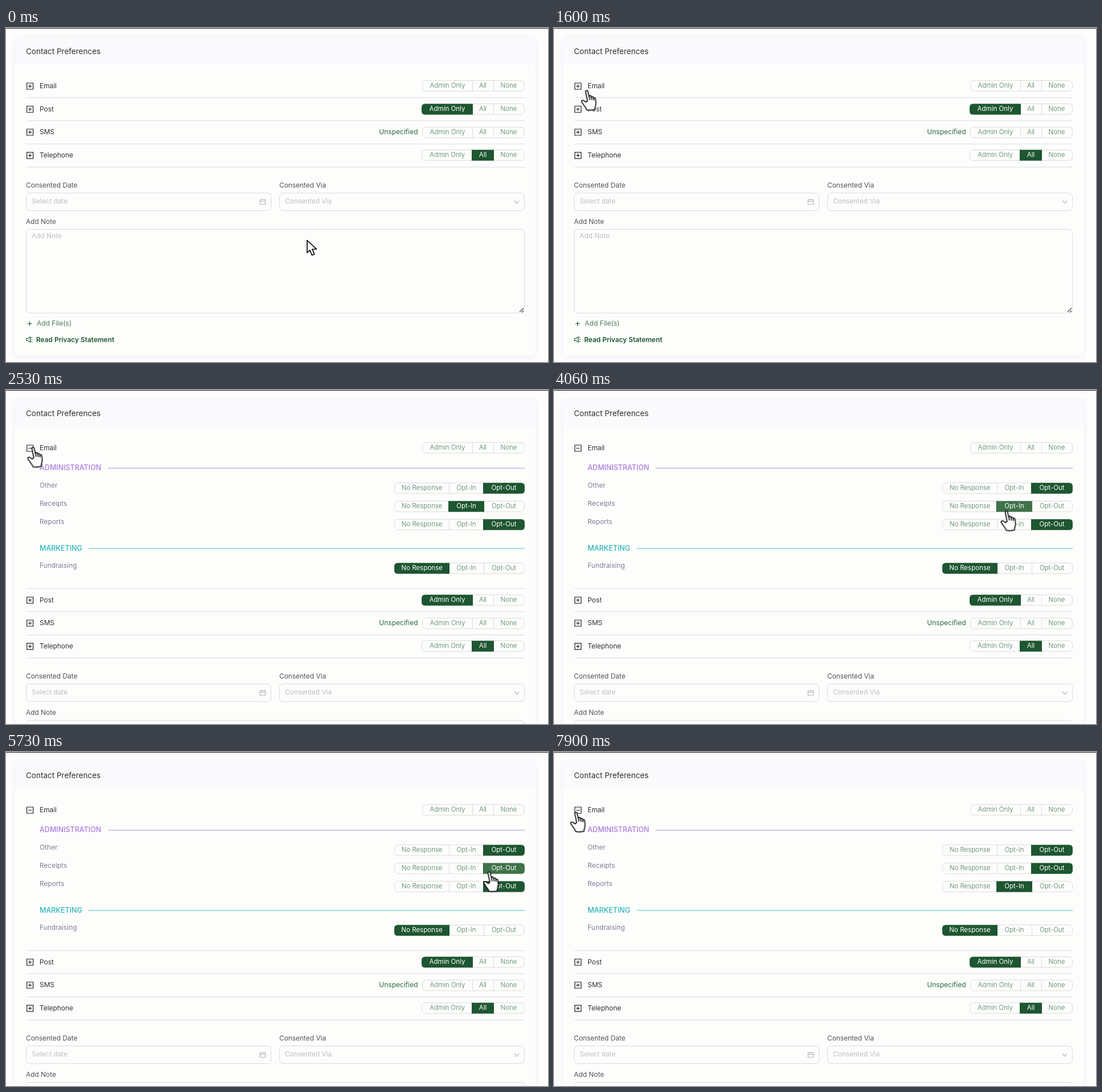
An HTML page that plays this animation: 952x588 px, repeating every 8000 ms.

```html
<!DOCTYPE html>
<html lang="en">
<head>
<meta charset="utf-8">
<title>Contact Preferences</title>
<style>
  html, body { margin: 0; width: 100%; height: 100%; overflow: hidden; background: #fefefe; }
  svg { display: block; width: 952px; height: 588px; }
  text { font: 400 11.9px Inter, "Open Sans", sans-serif; }
  .card { filter: drop-shadow(0 1px 6px rgba(150, 160, 215, .2)); }
  .icon { fill: none; stroke-width: 1.2; }
</style>
</head>
<body>
<svg id="stage" viewBox="0 0 952 588"></svg>
<script>
const LOOP = 8000, SHIFT = 227;
const GREEN = '#1d5630', HOVER = '#3f7249', PAPER = '#fdfefc', LINK = '#4b7a60';
const DARK = '#303033', LABEL = '#505256', MUTED = '#7b7f94', HINT = '#bdbebe';
const EDGE = '#d9dada', RULE = '#dfe0ed';
const LOOKS = {
  off: { fill: GREEN, opacity: 0, ink: LINK, weight: 300 },
  on: { fill: GREEN, opacity: 1, ink: '#ffffff', weight: 400 },
  hover: { fill: HOVER, opacity: 1, ink: '#ffffff', weight: 400 }
};
const stage = document.getElementById('stage');

function add(parent, tag, attrs = {}, content) {
  const el = document.createElementNS('http://www.w3.org/2000/svg', tag);
  for (const k in attrs) el.setAttribute(k, attrs[k]);
  if (content) el.textContent = content;
  parent.append(el);
  return el;
}

const group = parent => add(parent, 'g');
const label = (parent, x, y, content, fill = DARK, style = '') =>
  add(parent, 'text', { x, y, fill, style }, content);
const rule = (parent, x, y, stroke = RULE) =>
  add(parent, 'path', { d: `M${x} ${y}H911`, stroke, 'stroke-width': 1.3 });
const box = (parent, x, y, width, height, rx = 6) =>
  add(parent, 'rect', { x, y, width, height, rx, fill: PAPER, stroke: EDGE });
const icon = (parent, d, stroke) => add(parent, 'path', { d, stroke, class: 'icon' });

// steps: [time, value, easing to the next step]
function play(el, prop, steps, easing = 'ease') {
  const full = [...steps];
  if (full[0][0] > 0) full.unshift([0, full[0][1]]);
  if (full.at(-1)[0] < LOOP) full.push([LOOP, full.at(-1)[1]]);
  el.animate(
    full.map(([t, v, e]) => ({ offset: t / LOOP, [prop]: v, easing: e || easing })),
    { duration: LOOP, iterations: Infinity });
}

function segment(parent, x0, x1, y, name, look, first, last) {
  const l = first ? 6 : 0, r = last ? 6 : 0, top = y + .4, bottom = top + 19.2;
  const d = `M${x0 + l} ${top}H${x1 - r}q${r} 0 ${r} ${r}V${bottom - r}q0 ${r} ${-r} ${r}` +
    `H${x0 + l}q${-l} 0 ${-l} ${-l}V${top + l}q0 ${-l} ${l} ${-l}z`;
  const back = add(parent, 'path', { d, fill: look.fill, opacity: look.opacity });
  const edge = add(parent, 'path', {
    d: `M${x0 + .5} ${top}V${bottom}`, stroke: GREEN, opacity: first ? 0 : look.opacity
  });
  const text = label(parent, (x0 + x1) / 2, y + 13.2, name, look.ink,
    `font-size:11.5px;font-weight:${look.weight};text-anchor:middle`);
  return { back, edge, text };
}

function choices(parent, y, names, edges, selected) {
  const end = names.length;
  box(parent, edges[0] + .5, y + .5, edges[end] - edges[0] - 1, 18.7);
  for (const x of edges.slice(1, end))
    add(parent, 'path', { d: `M${x + .5} ${y + 1}v18`, stroke: EDGE });
  return names.map((name, i) => segment(parent, edges[i] - (i ? 1 : 0),
    edges[i + 1] + (i < end - 1 ? 1 : 0), y, name,
    i === selected ? LOOKS.on : LOOKS.off, i === 0, i === end - 1));
}

// A selected label is a little bolder, which widens its group
const scope = (parent, y, selected) =>
  choices(parent, y, ['Admin Only', 'All', 'None'], [selected < 0 ? 731 : 730, 819, 856, 911], selected);
const response = (parent, y, selected) =>
  choices(parent, y, ['No Response', 'Opt-In', 'Opt-Out'], [682, 778, 839, 911], selected);

function toggle(parent, y) {
  icon(parent, `M36.6 ${y - 5.5}h11v11h-11zM39 ${y}h6.2`, '#222');
  return icon(parent, `M42.1 ${y - 3.1}v6.2`, '#222');
}

// Page and card
add(stage, 'rect', { width: 952, height: 588, fill: '#fefefe' });
const card = add(stage, 'rect', { x: 16, y: 17, width: 914, height: 560, rx: 7, fill: PAPER, class: 'card' });
add(stage, 'path', { d: 'M16 64V24q0-7 7-7H923q7 0 7 7V64z', fill: '#fafafd' });
add(stage, 'rect', { width: 952, height: 1, fill: '#1c1c1c' });
label(stage, 35, 45.5, 'Contact Preferences', DARK, 'font-size:13.5px');

// Email details
const detail = group(stage);
const heading = 'font-size:12.5px;font-weight:500';
label(detail, 59, 141.3, 'ADMINISTRATION', '#ab7be0', heading);
rule(detail, 179, 137.7, '#c2a6e6');
label(detail, 59, 282.7, 'MARKETING', '#2bb7bb', heading);
rule(detail, 145, 278.8, '#62d0d2');
const [, receipts, reports] = [
  ['Other', 163, 2], ['Receipts', 195, 1], ['Reports', 227, 2], ['Fundraising', 304, 0]
].map(([name, y, selected]) => {
  label(detail, 59, y + 9.3, name, MUTED);
  return response(detail, y, selected);
});

// Everything below slides down to uncover the details
const lower = group(stage);
add(lower, 'rect', { x: 28, y: 123, width: 890, height: 445, fill: PAPER });
for (const y of [122.7, 163.2, 204.2, 244.8]) rule(lower, 36, y);
[['Post', 143, 0], ['SMS', 183.5, -1], ['Telephone', 224.3, 1]].forEach(([name, y, selected]) => {
  toggle(lower, y);
  label(lower, 59, y + 3.7, name);
  scope(lower, Math.round(y - 10), selected);
});
label(lower, 723.5, 187, 'Unspecified', '#2b6541', 'font-size:12px;text-anchor:end');

label(lower, 35, 281, 'Consented Date', LABEL);
label(lower, 480, 281, 'Consented Via', LABEL);
label(lower, 35, 345, 'Add Note', LABEL);
const dateBox = box(lower, 35.5, 290.5, 430, 31);
box(lower, 480.5, 290.5, 430, 31);
const noteBox = box(lower, 35.5, 354.5, 875, 147.5);
label(lower, 45, 309.3, 'Select date', HINT);
label(lower, 490, 309.3, 'Consented Via', HINT);
label(lower, 45, 369.7, 'Add Note', HINT);
icon(lower, 'M446.2 302.5h9.4v8h-9.4zM446.2 305.5h9.4M448.6 301v2.8M453.2 301v2.8', '#b4b5b5');
icon(lower, 'M893 304l4 4.8 4-4.8', '#b4b5b5');
icon(lower, 'M902 500l7-7M906 500.5l3-3', '#444');
icon(lower, 'M37.5 520.5h8M41.5 516.5v8', GREEN);
label(lower, 54, 524.3, 'Add File(s)', LINK, 'font-size:12px');
icon(lower, 'M36 546.5h2.6l4-2.7v9.4l-4-2.7H36zM44.2 545.6l1.8-1M44.4 548.5h2M44.2 551.4l1.8 1', GREEN);
label(lower, 53, 552.7, 'Read Privacy Statement', GREEN, 'font-weight:600');

// Email row
const emailBar = toggle(stage, 102.5);
label(stage, 59, 106, 'Email');
scope(stage, 92, -1);

// Pointer
const pointer = group(stage);
const ink = { fill: '#fff', stroke: '#161616', 'stroke-width': 1.8, 'stroke-linejoin': 'round', 'stroke-linecap': 'round' };
const arrow = add(pointer, 'path', { ...ink, d: 'M.9 .9V22.6L5.8 18.2 9.5 27 13.7 25.2 10 16.6 17.4 16.2z' });
const hand = add(pointer, 'g', { ...ink, transform: 'translate(-9.5 -.8)' });
add(hand, 'path', {
  d: 'M8.1 3C7.6.5 11.4 0 12 2.4L14.2 11.2C14.6 9.5 17.4 9.6 18 11.5L18.2 12.5C19 11 21.5 11.4 21.8 13.3' +
     'L22 14.2C23 13 25.2 13.6 25.4 15.7L26 22C26.3 26 25.4 28.5 24.5 30.8L24.3 34.2C20 35.6 13.5 35.6 9.8 34.8' +
     'C9 31.6 6.6 29.4 4.4 26 3 23.7 1.5 22 1 20.6 .4 18.6 2.8 17.4 4.6 18.6L8.6 21.3 11.3 19z'
});
add(hand, 'path', { d: 'M14.2 11.2l1.1 5.4M18.2 12.5l.8 4.4M22 14.2l.4 3.4', fill: 'none' });

// Timeline
const slide = (a, b, from, to) => [[a, from], [b, to]];
const path = [
  [0, 528, 373], [460, 528, 373], [820, 173, 275], [1130, 173, 275],
  [1600, 57, 110, 'ease-out'], [1930, 47, 101], [3260, 47, 101], [3400, 503, 188],
  [3760, 503, 188], [4060, 794, 213, 'ease-in'], [4360, 856, 213], [4530, 848, 211],
  [5730, 848, 211], [6100, 807, 234], [6740, 807, 234, 'ease-in'], [6820, 780, 246, 'ease-out'],
  [7200, 141, 104], [7460, 141, 104], [7900, 38, 106]
];
play(pointer, 'transform', path.map(([t, x, y, e]) => [t, `translate(${x}px, ${y}px)`, e]), 'ease-in-out');

const overLink = [[0, 0], [1280, 1], [3300, 0], [3900, 1], [6860, 0], [7040, 1]];
play(hand, 'opacity', overLink, 'step-end');
play(arrow, 'opacity', overLink.map(([t, v]) => [t, 1 - v]), 'step-end');

play(noteBox, 'stroke', [[0, EDGE], [270, HOVER], [540, HOVER], [840, EDGE]]);
play(dateBox, 'stroke', [[600, EDGE], [660, '#a9b8ad'], [900, EDGE]]);

play(lower, 'transform', slide(2290, 2510, 'translateY(0px)', `translateY(${SHIFT}px)`), 'ease-in-out');
play(card, 'height', slide(2290, 2510, '560px', `${560 + SHIFT}px`), 'ease-in-out');
play(detail, 'opacity', slide(2290, 2510, 0, 1));
play(emailBar, 'opacity', [[0, 1], [2300, 0]], 'step-end');

function fade({ back, edge, text }, steps) {
  const pick = key => steps.map(([t, state]) => [t, LOOKS[state][key]]);
  play(back, 'fill', pick('fill'));
  play(back, 'opacity', pick('opacity'));
  play(edge, 'opacity', pick('opacity'));
  play(text, 'fill', pick('ink'));
  play(text, 'fontWeight', pick('weight'));
}
fade(receipts[1], [[3790, 'on'], [4050, 'hover'], [4330, 'hover'], [4640, 'on'], [4930, 'on'], [5230, 'off']]);
fade(receipts[2], [[4930, 'off'], [5230, 'hover'], [5780, 'hover'], [6080, 'on']]);
fade(reports[1], [[6560, 'off'], [6860, 'hover'], [6880, 'hover'], [7180, 'on']]);
fade(reports[2], [[6560, 'on'], [6860, 'off']]);
</script>
</body>
</html>
```
